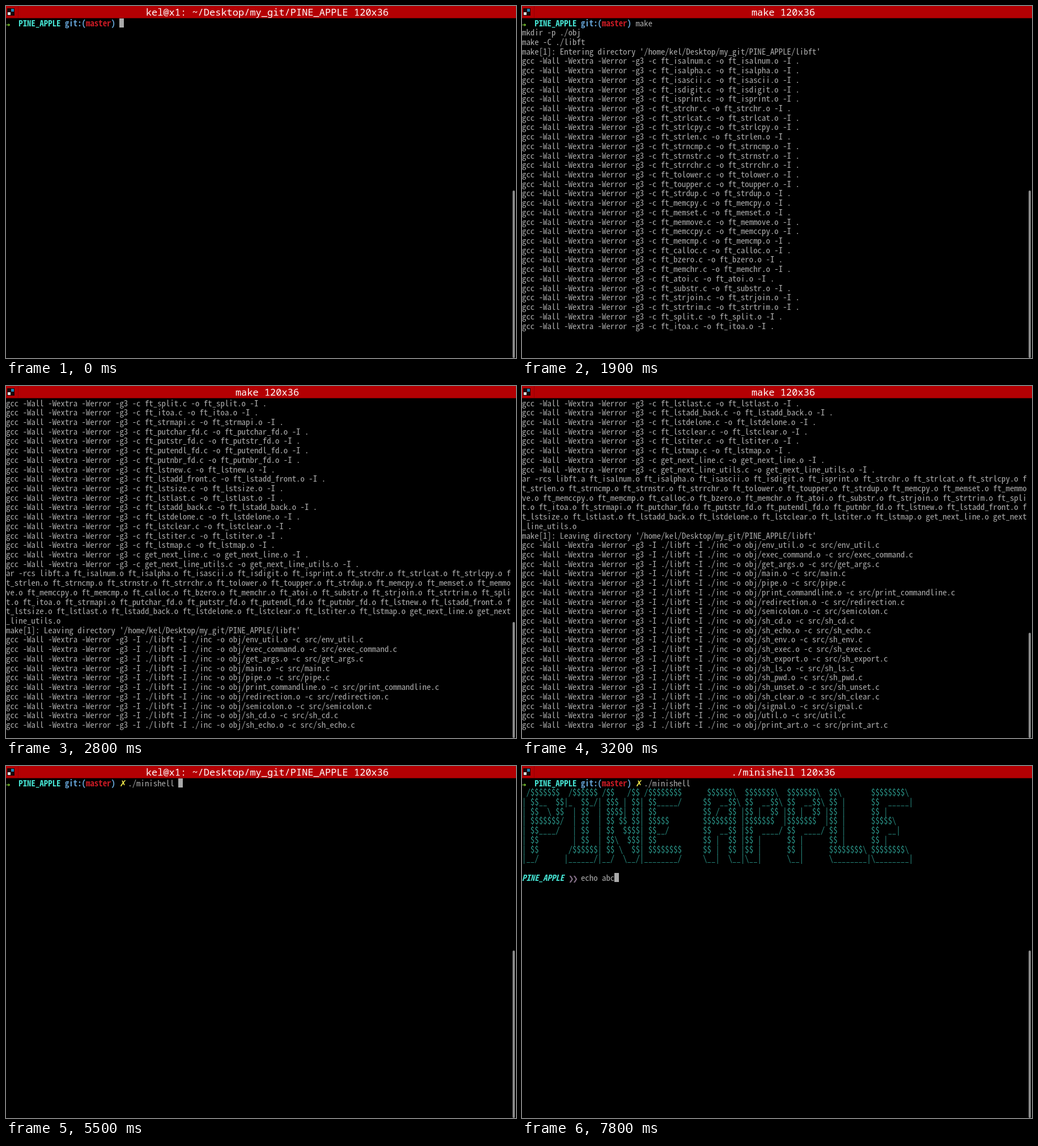
An HTML page that plays this animation: 900 by 622 pixels, repeating every 8 s.

```html
<!DOCTYPE html>
<html lang="en">
<head>
<meta charset="utf-8">
<title>Terminal</title>
<style>
html, body { margin: 0; width: 100%; height: 100%; overflow: hidden; background: #000; }
#stage { position: relative; width: 900px; height: 622px; overflow: hidden; background: #000; }
#bar { position: absolute; width: 900px; height: 21px; background: #b40003; border-bottom: 1px solid #5a0002; }
#icon { position: absolute; left: 2px; top: 4px; width: 13px; height: 13px; background: #1c0506; }
#icon i { position: absolute; width: 5px; height: 5px; }
#title { position: absolute; left: 21px; width: 878px; height: 21px; text-align: center; color: #fff;
  border-left: 1px solid #960003; font: 17px/21px "Noto Sans Mono", monospace; white-space: pre; }
#screen { position: absolute; left: 0; top: 21.5px; margin: 0; color: #aaa;
  font: 14.85px/16.72px "Noto Sans Mono CJK KR", "Noto Sans Mono CJK JP", "Noto Sans Mono CJK SC", monospace;
  font-variant-ligatures: none; }
#screen div { height: 16.72px; white-space: pre; }
#screen s { display: inline-block; width: 7.425px; text-decoration: none; font-family: "DejaVu Sans", sans-serif; line-height: 1px; }
#cursor { position: absolute; width: 7.7px; height: 16.72px; background: #aaa; }
#thumb { position: absolute; left: 894px; width: 4px; bottom: 0; border-radius: 2px; background: #888; }
.green { color: #8ae234; font-size: 9px; font-weight: bold; }
.cyan { color: #45e0d0; }
.blue { color: #629fd0; }
.red { color: #c91a24; }
.yellow { color: #f0e84a; font-size: 15px; }
.teal { color: #2a9488; }
.mauve { color: #857088; font-size: 12px; }
</style>
</head>
<body>
<div id="stage">
  <div id="bar">
    <div id="icon">
      <i style="left:7px;top:1px;background:#1b87b5"></i>
      <i style="left:1px;top:7px;background:#ddd"></i>
    </div>
    <div id="title"></div>
  </div>
  <pre id="screen"></pre>
  <div id="cursor"></div>
  <div id="thumb"></div>
</div>
<script>
const CELL = 7.425, ROW = 16.72, TOP = 21.5, COLS = 120, ROWS = 36, LOOP = 8000;
const $ = id => document.getElementById(id);
const span = (cls, text) => `<span class="${cls}">${text}</span>`;
const symbol = (cls, text) => `<s class="${cls}">${text}</s>`;
const wrap = text => text.match(new RegExp(`.{1,${COLS}}`, 'g'));

const HOME = '~/Desktop/my_git/PINE_APPLE';
const CC = 'gcc -Wall -Wextra -Werror -g3';
const prompt = symbol('green', '➜') + '  <b>' + span('cyan', 'PINE_APPLE') + ' ' +
  span('blue', 'git:(') + span('red', 'master') + span('blue', ')') + '</b> ';
const dirty = prompt + symbol('yellow', '✗') + ' ';
const shell = '<b><em>' + span('cyan', 'PINE_APPLE') + '</em></b> ' + symbol('mauve', '❯').repeat(2) + ' ';

const lib = (`isalnum isalpha isascii isdigit isprint strchr strlcat strlcpy strlen strncmp strnstr strrchr
 tolower toupper strdup memcpy memset memmove memccpy memcmp calloc bzero memchr atoi substr strjoin strtrim
 split itoa strmapi putchar_fd putstr_fd putendl_fd putnbr_fd lstnew lstadd_front lstsize lstlast lstadd_back
 lstdelone lstclear lstiter lstmap`).split(/\s+/).map(n => 'ft_' + n)
  .concat('get_next_line', 'get_next_line_utils');
const src = (`env_util exec_command get_args main pipe print_commandline redirection semicolon
 sh_cd sh_echo sh_env sh_exec sh_export sh_ls sh_pwd sh_unset sh_clear signal util print_art`).split(/\s+/);
const libDir = `directory '/home/kel${HOME.slice(1)}/libft'`;

const log = [
  prompt + 'make',
  'mkdir -p ./obj',
  'make -C ./libft',
  'make[1]: Entering ' + libDir,
  ...lib.map(n => `${CC} -c ${n}.c -o ${n}.o -I .`),
  ...wrap('ar -rcs libft.a ' + lib.map(n => n + '.o').join(' ')),
  'make[1]: Leaving ' + libDir,
  ...src.map(n => `${CC} -I ./libft -I ./inc -o obj/${n}.o -c src/${n}.c`),
  ...wrap('gcc ' + src.map(n => `./obj/${n}.o`).join(' ') + ' -L ./libft -l ft -o minishell'),
];

const art = String.raw`
 /$$$$$$$  /$$$$$$ /$$   /$$ /$$$$$$$$      $$$$$$\  $$$$$$$\  $$$$$$$\  $$\       $$$$$$$$\
| $$__  $$|_  $$_/| $$$ | $$| $$_____/     $$  __$$\ $$  __$$\ $$  __$$\ $$ |      $$  _____|
| $$  \ $$  | $$  | $$$$| $$| $$           $$ /  $$ |$$ |  $$ |$$ |  $$ |$$ |      $$ |
| $$$$$$$/  | $$  | $$ $$ $$| $$$$$        $$$$$$$$ |$$$$$$$  |$$$$$$$  |$$ |      $$$$$\
| $$____/   | $$  | $$  $$$$| $$__/        $$  __$$ |$$  ____/ $$  ____/ $$ |      $$  __|
| $$        | $$  | $$\  $$$| $$           $$ |  $$ |$$ |      $$ |      $$ |      $$ |
| $$       /$$$$$$| $$ \  $$| $$$$$$$$     $$ |  $$ |$$ |      $$ |      $$$$$$$$\ $$$$$$$$\
|__/      |______/|__/  \__/|________/     \__|  \__|\__|      \__|      \________|\________|`
  .split('\n').slice(1).map(line => span('teal', line));

// Last value whose start time has passed.
const at = (t, steps) => steps.reduce((v, [start, next]) => t >= start ? next : v, steps[0][1]);

function linesBuilt(t) {
  const step = Math.floor((t - 1000) / 100);
  if (t < 2500) return 6 + 3 * step;
  if (t < 3000) return 12 + 3 * step;
  return at(t, [[3000, 71], [3100, 74], [3200, 76], [3300, 80]]);
}

function scene(t) {
  const idle = `kel@x1: ${HOME}`;
  if (t < 1000) {
    const typed = at(t, [[0, ''], [600, 'm'], [700, 'mak']]);
    return { title: idle, lines: [prompt + typed], col: 27 + typed.length, on: t < 300 || t >= 400 };
  }
  if (t < 3400) {
    return { title: 'make', lines: [...log.slice(0, linesBuilt(t)), ''], col: 0,
      on: Math.floor((t - 1000) / 600) % 2 === 0 };
  }
  if (t < 4500) {
    const typed = at(t, [[0, ''], [3800, 'c'], [4000, 'cl'], [4100, 'clea'], [4300, 'clear']]);
    return { title: idle, lines: [...log, dirty + typed], col: 29 + typed.length, on: true, reset: t >= 4300 };
  }
  if (t < 6000) {
    const typed = at(t, [[0, ''], [4800, './'], [5100, './m'], [5500, './minishell ']]);
    return { title: t < 5800 ? idle : './minishell', lines: [dirty + typed], col: 29 + typed.length, on: true };
  }
  const typed = at(t, [[0, ''], [6800, 'e'], [6900, 'ech'], [7100, 'echo'], [7300, 'echo '],
    [7500, 'echo a'], [7700, 'echo ab'], [7800, 'echo abc']]);
  return { title: './minishell', lines: [dirty + './minishell', ...art, '', shell + typed],
    col: 14 + typed.length, on: t < 6400 || t >= 6600 };
}

let shown = -1;
function draw(now) {
  const t = Math.floor(now % LOOP / 100) * 100;
  if (t !== shown) {
    shown = t;
    const { title, lines, col, on, reset } = scene(t);
    const scrolled = Math.max(0, lines.length - ROWS);
    const history = ROWS + (reset ? 0 : scrolled);
    $('title').textContent = title + ' 120x36';
    $('screen').innerHTML = lines.slice(scrolled).map(l => `<div>${l}</div>`).join('');
    $('cursor').style.cssText = `left:${col * CELL}px; top:${TOP + (lines.length - scrolled - 1) * ROW}px; opacity:${+on}`;
    $('thumb').style.top = 23.7 + 604.5 * history / (history + ROWS) + 'px';
  }
  requestAnimationFrame(draw);
}
requestAnimationFrame(draw);
</script>
</body>
</html>
```
